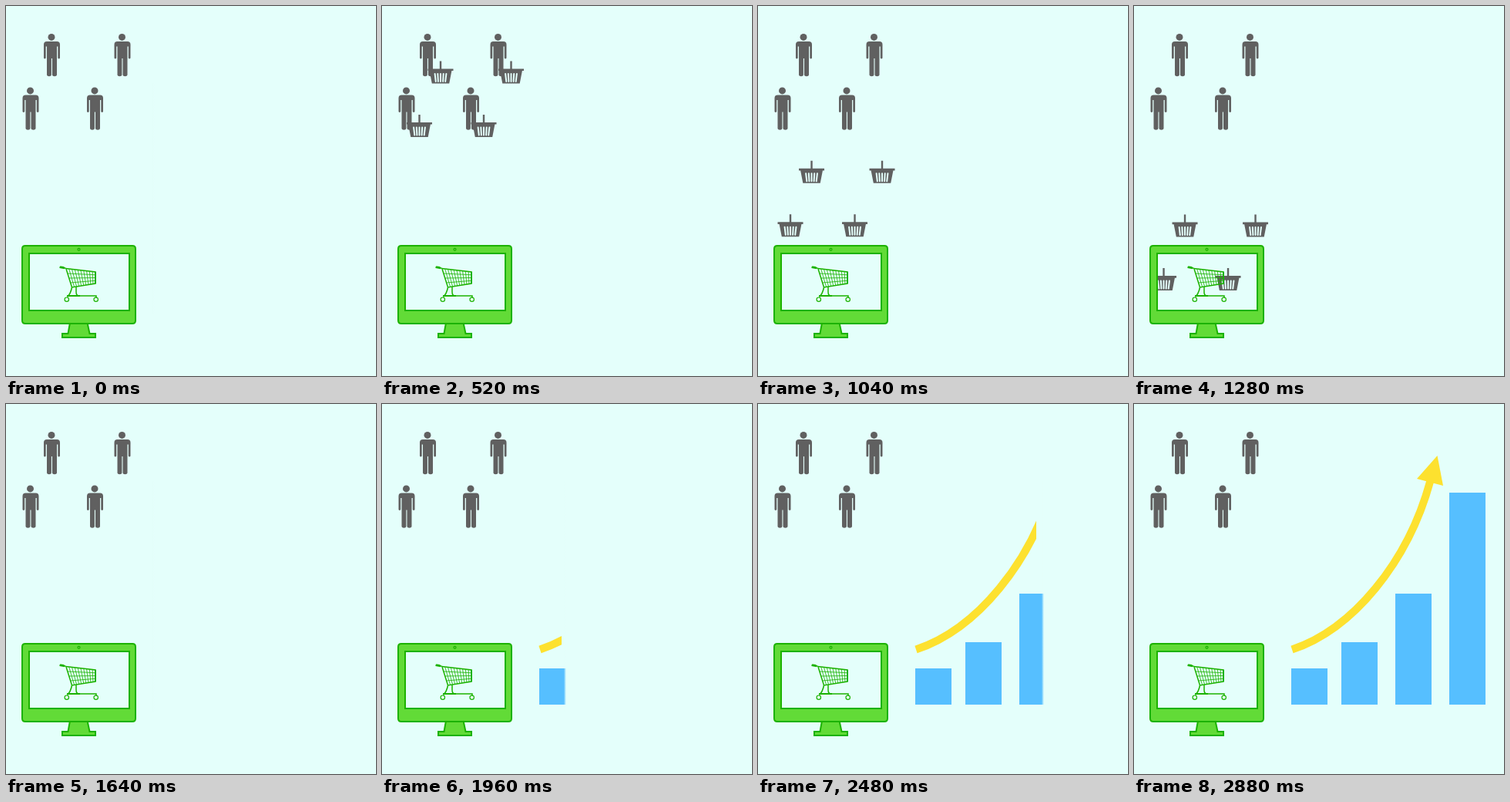
These frames come from a looping animation (480 px wide and 480 px high, 3400 ms). An HTML page:

```html
<!DOCTYPE html>
<html lang="en">
<head>
<meta charset="utf-8">
<title>Shop growth</title>
<style>
  html, body { margin: 0; width: 100%; height: 100%; overflow: hidden; background: #e4fffb; }
  svg { display: block; width: 100vw; height: 100vh; }
</style>
</head>
<body>
<svg viewBox="0 0 480 480">
  <defs>
    <g id="person" fill="#606060">
      <circle cx="59" cy="40.4" r="4.5"/>
      <path d="M53 46H66Q70 46 70 50V67.5Q68.7 69.5 67.3 67.5V52.5H66V89.5Q65.7 91.2 63 91.2Q60.3 91.2 60 89.5V68H58.9V89.5Q58.6 91.2 56 91.2Q53.3 91.2 53 89.5V52.5H51.7V67.5Q50.3 69.5 49 67.5V50Q49 46 53 46Z"/>
    </g>
    <g id="basket" fill="#606060">
      <path d="M-1.2-15H1.2V-5H16.5V-2.4H14.4L11.2 14H-11.2L-14.4-2.4H-16.5V-5H-1.2Z"/>
      <path d="M-7.4 1.5L-6.2 11.5M-3.7 1.5L-3.1 11.5M0 1.5V11.5M3.7 1.5L3.1 11.5M7.4 1.5L6.2 11.5"
            stroke="#e4fffb" stroke-width="2" stroke-linecap="round"/>
    </g>
    <linearGradient id="soft" gradientUnits="userSpaceOnUse" x1="0" x2="3" y1="0" y2="0">
      <stop stop-color="#e4fffb" stop-opacity="0"/>
      <stop offset="1" stop-color="#e4fffb"/>
    </linearGradient>
    <clipPath id="reveal"><rect id="arrowClip" x="190" y="50" width="0" height="300"/></clipPath>
  </defs>

  <g id="people"></g>
  <g id="baskets"></g>

  <g fill="#62db37" stroke="#1cb200" stroke-width="2">
    <path d="M83 411L80.5 425H73V430H116V425H108.5L105.5 411Z"/>
    <path fill-rule="evenodd" d="M25 311H164Q168 311 168 315V408Q168 412 164 412H25Q21 412 21 408V315Q21 311 25 311ZM30 321V395H160V321Z"/>
    <circle cx="94.5" cy="315.8" r="1.5" stroke-width="1.2"/>
  </g>
  <g fill="none" stroke="#1cb200" stroke-width="1.5">
    <path d="M70 338.3Q74 337.8 77.5 340.5L116 345V360L85.5 365L78 341M85.5 365Q84 373 79.5 377.5M91 364V371Q91 376 95 376H117V379"/>
    <path d="M69.5 339L76 340.3M79 376H96" stroke-width="1.8"/>
    <path d="M116 345V360" stroke-width="2"/>
    <path id="mesh" stroke-width=".8"/>
    <circle cx="78.8" cy="380.7" r="2.7" stroke-width="1.2"/>
    <circle cx="116.7" cy="380.7" r="2.7" stroke-width="1.2"/>
  </g>

  <path fill="#56bfff" d="M204 343h47v47h-47ZM269 309h47v81h-47ZM339 246h47v144h-47ZM409 115h47v275h-47Z"/>
  <rect id="cover" y="100" width="300" height="300" fill="url(#soft)"/>
  <g clip-path="url(#reveal)">
    <path d="M205 318.5C283.8 292.3 355.4 205.5 384.3 100" fill="none" stroke="#fde12f" stroke-width="10"/>
    <path d="M393.5 67L401 106L367 97Z" fill="#fde12f"/>
  </g>
</svg>
<script>
const LOOP = 3400, STEP = 40;
const $ = id => document.getElementById(id);
const clamp = v => Math.min(1, Math.max(0, v));

const spots = [[0, 0], [91.5, 0], [-27.5, 69.5], [56, 69.5]];
const copies = id => spots.map(([x, y]) => `<use href="#${id}" x="${x}" y="${y}"/>`).join('');
$('people').innerHTML = copies('person');
$('baskets').innerHTML = copies('basket');

// Wire mesh of the cart, spanned between its top and bottom rails
const mesh = [];
for (let i = 1; i < 10; i++) {
  const u = i / 10;
  mesh.push(`M${78 + 38 * u} ${341 + 4 * u}L${85.5 + 30.5 * u} ${365 - 5 * u}`);
}
for (let i = 1; i < 4; i++) {
  const u = i / 4;
  mesh.push(`M${78 + 7.5 * u} ${341 + 24 * u}L116 ${345 + 15 * u}`);
}
$('mesh').setAttribute('d', mesh.join(''));

// Steady travel with short ramps at both ends
function glide(u, ramp = 0.13) {
  const v = 1 / (1 - ramp);
  if (u < ramp) return v * u * u / (2 * ramp);
  if (u > 1 - ramp) return 1 - v * (1 - u) ** 2 / (2 * ramp);
  return v * (u - ramp / 2);
}

function draw() {
  const t = Math.floor(performance.now() % LOOP / STEP) * STEP;

  const p = glide(clamp((t - 530) / 1000));
  $('baskets').setAttribute('transform', `translate(${76 - 12.65 * p} ${86.4 + 253 * p})`);
  $('baskets').setAttribute('opacity', t < 480 ? 0 : 1 - clamp((t - 1530) / 110));

  const barEdge = Math.max(190, 307 + 0.254 * (t - 2240));
  $('cover').setAttribute('transform', `translate(${barEdge} 0)`);
  const arrowEdge = 302 + 0.246 * (t - 2240);
  $('arrowClip').setAttribute('width', Math.max(0, arrowEdge - 190));

  requestAnimationFrame(draw);
}
draw();
</script>
</body>
</html>
```
